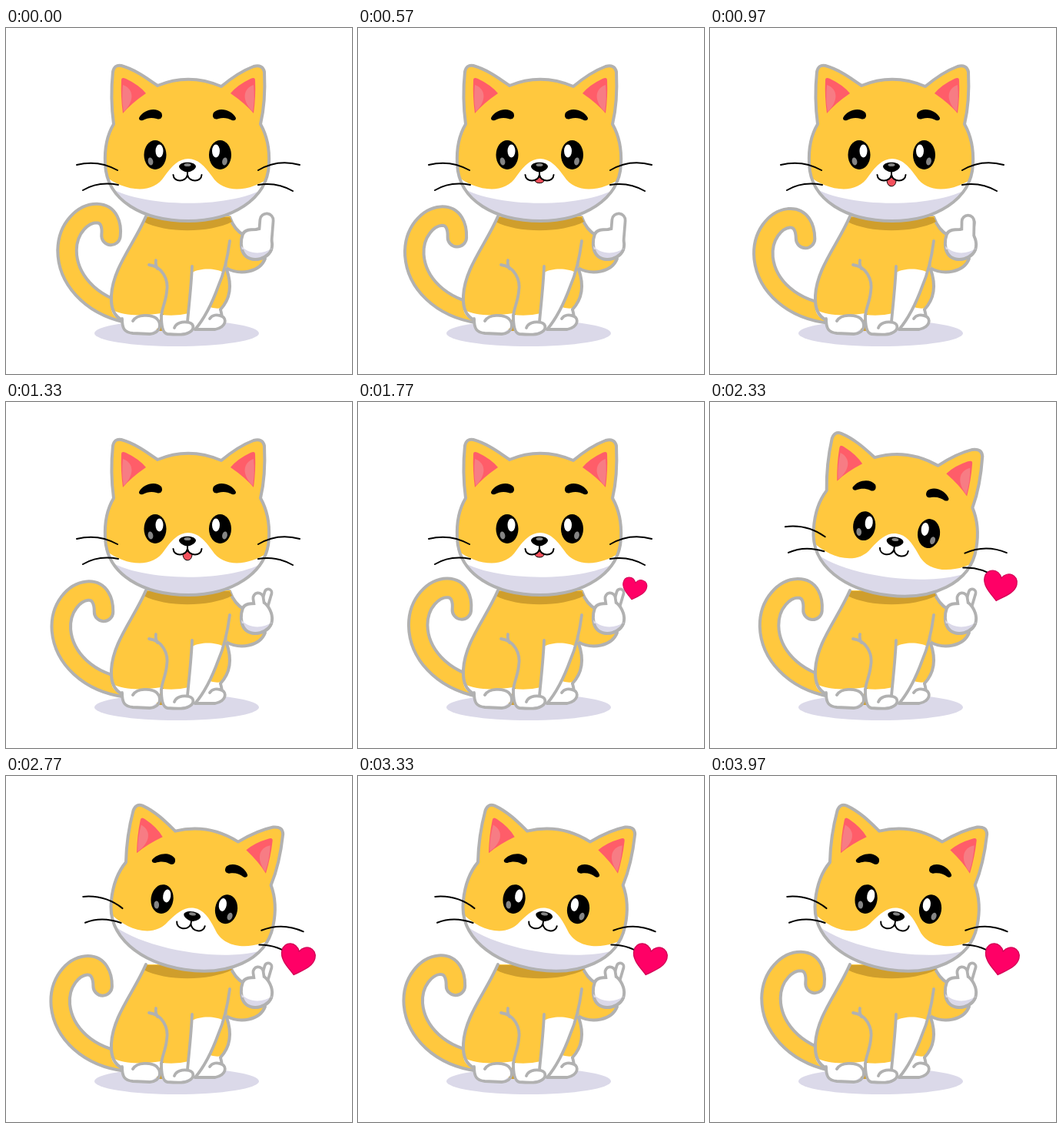
An HTML page that plays this animation: 450 by 450 pixels, repeating every 4.01 s.

```html
<!DOCTYPE html>
<html lang="en">
<head>
<meta charset="utf-8">
<title>Cat with a heart</title>
<style>
  html, body { margin: 0; width: 100%; height: 100%; overflow: hidden; background: #fff; }
  svg { display: block; width: 100vw; height: 100vh; }
  path, ellipse { stroke-linecap: round; stroke-linejoin: round; }
  .fur { fill: #ffc83e; }
  .white { fill: #fff; }
  .shade { fill: #dbd9e9; }
  .dark { fill: #cf9e2c; }
  .edge { stroke: #b1b1b1; stroke-width: 4; }
  .line { fill: none; stroke: #b1b1b1; stroke-width: 3.8; }
  .ink { fill: none; stroke: #000; stroke-width: 2; }
  .grey { fill: #858585; }
  .pink { fill: #ff5d69; }
  .soft { fill: #f77c84; }
  .tail { fill: none; stroke: #b1b1b1; stroke-width: 28.5; }
  .tail.in { stroke: #ffc83e; stroke-width: 20.5; }
</style>
</head>
<body>
<svg viewBox="0 0 450 450">
  <defs>
    <path id="tailPath" d="M158 371C108 360 79.500 325 79.500 289C80 259 101 241 118 241C134 241.500 138 256 136.500 270"/>
    <path id="headPath" d="M140 125C137 103 137 76 139 57Q141 47 150 49C168 54 183 65 197 75Q238 58 280 76C292 66 306 56 322 50Q334 47 336 57C337 77 336 104 331 125C340 141 343 158 342 177C340 224 292 251 237 251C179 251 131 225 129 177C128 158 131 140 140 125Z"/>
    <path id="palm" d="M308 268C311 262 318 262 325 262L334 260C342 264 347 276 346 284C345 300 318 308 309 293C305 286 305 276 308 268Z"/>
    <g id="ear">
      <path class="pink" d="M150 68Q150 63 156 66Q173 74 182 85Q163 98 152 111Q149 89 150 68Z"/>
      <path class="soft" d="M152 74C166 79 168 94 153 109Q150 92 152 74Z"/>
    </g>
    <path id="brow" d="M173 117C178 107 194 102 202 110C205 116 201 120 196 118C189 116 184 117 178 120Q173 121 173 117Z"/>
    <g id="eye">
      <ellipse cx="194" cy="165" rx="14.500" ry="19"/>
      <ellipse class="white" cx="199.500" cy="160" rx="5" ry="8.500"/>
      <ellipse class="grey" cx="188" cy="173.500" rx="3.300" ry="5" transform="rotate(-12 188 173.500)"/>
    </g>
    <clipPath id="headClip"><use href="#headPath"/></clipPath>
    <clipPath id="palmClip"><use href="#palm"/></clipPath>
  </defs>

  <ellipse class="shade" cx="222" cy="397" rx="107" ry="17"/>

  <g id="tail">
    <use class="tail" href="#tailPath"/>
    <use class="tail in" href="#tailPath"/>
  </g>

  <!-- arm -->
  <path class="fur edge" d="M284 246L291 246C296 260 303 266 310 270L337 300C330 318 304 322 286 312Z"/>

  <!-- body fills -->
  <path class="fur" d="M182 245C166 282 139 312 137 348C136 367 142 375 151 380L153 392H270L280 366C292 352 294 334 287 314L292 245Z"/>
  <path class="dark" d="M181 246L291 246L294 252C264 267 208 267 179 252ZM196 372H205V394H196Z"/>
  <path class="white" d="M262 362Q273 366 280 364C288 376 287 390 273 391H244Z"/>
  <path class="white" d="M242 318C252 312 273 312 283 318C274 346 264 374 246 392H236Z"/>
  <path class="white" d="M137 366C155 376 180 374 202 371L198 390L187 398H165Q152 396 151 380Q139 377 137 366Z"/>
  <path class="white" d="M202 373Q222 375 238 371L244 390Q234 399 210 398Q202 394 202 373Z"/>

  <!-- body lines -->
  <path class="line" style="stroke-width:4" d="M182 245C166 282 139 312 137 348C136 367 142 375 151 380M287 314C294 334 292 352 279 366"/>
  <path class="line" d="M151 378C151 391 154 396 165 397L187 398C201 397 203 385 196 378C189 372 170 372 165 381"/>
  <path class="line" d="M279 366L281 375M246 392H272C287 389 287 378 281 375C275 372 268 373 265 378"/>
  <path class="line" d="M202 374C202 385 203 397 210 398C222 399 232 399 236 397C246 393 245 385 238 383C229 381 221 384 219 390"/>
  <path class="line" d="M186 308C203 310 212 327 209 343C208 355 203 364 202 374M195 302Q194 308 197 313M242 310C241 335 238 360 236 382M291 277C288 300 283 320 276 336C268 358 258 378 246 392"/>

  <!-- hand -->
  <g id="hand">
    <path class="finger out"/><path class="finger in"/>
    <path class="thumb out"/>
    <use class="white edge" href="#palm"/>
    <path class="thumb in"/>
    <path class="shade" clip-path="url(#palmClip)" d="M304 281C314 295 334 296 348 285V306H304Z"/>
    <use class="edge" style="clip-path:inset(30px 0 0 0)" fill="none" href="#palm"/>
  </g>

  <g id="head">
    <use class="fur" href="#headPath"/>
    <g clip-path="url(#headClip)">
      <path class="white" d="M126 190C148 210 189 220 206 193C216 179 225 170 237 170C249 170 258 179 268 193C285 220 326 210 348 190V260H126Z"/>
      <path class="shade" d="M124 200C165 237 309 237 348 200V260H124Z"/>
    </g>
    <use class="edge" fill="none" href="#headPath"/>

    <use href="#ear"/>
    <use href="#ear" transform="matrix(-1 0 0 1 474 0)"/>
    <use href="#brow"/>
    <use href="#brow" transform="matrix(-1 0 0 1 472 0)"/>
    <use href="#eye"/>
    <use href="#eye" transform="matrix(-1 0 0 1 472.500 0)"/>

    <path id="tongue" fill="#f4515d" stroke="#000" stroke-width="1"/>
    <path class="ink" d="M236 186V191M217.500 191C218 201 234 201 236 191C238 201 254 201 254.500 191"/>
    <path d="M225 180C226 173 246 173 247 180C247 184 239 187.500 236 187.500C233 187.500 225 184 225 180Z"/>
    <ellipse class="grey" cx="236" cy="178" rx="4.500" ry="2"/>

    <path class="ink" d="M92 178Q120 171 145 185M100 211Q120 199 146 204M328 185Q353 170 382 178M328 204Q352 200 373 212"/>
  </g>

  <path id="heart" fill="#ff0066" stroke="#d60057" stroke-width="1.500" d="M0 21C-8 14 -22 6 -22 -6C-22 -19 -6 -22 0 -10C6 -22 22 -19 22 -6C22 6 8 14 0 21Z"/>
</svg>

<script>
const LOOP = 4010;
const $ = s => document.querySelector(s);
const span = (t, a, b) => Math.min(1, Math.max(0, (t - a) / (b - a)));
const ease = (t, a, b) => (1 - Math.cos(Math.PI * span(t, a, b))) / 2;
const mix = (a, b, p) => a + (b - a) * p;

// A rounded finger: from and to are [x1, y1, x2, y2, width]
function finger(name, from, to, p) {
  const [x1, y1, x2, y2, w] = from.map((v, i) => mix(v, to[i], p));
  for (const [part, color, width] of [['out', '#b1b1b1', w], ['in', '#fff', w - 7.5]]) {
    const el = $(`.${name}.${part}`);
    el.setAttribute('d', `M${x1} ${y1}L${x2} ${y2}`);
    el.setAttribute('stroke', color);
    el.setAttribute('stroke-width', width);
  }
}

function draw(t) {
  const swing = 3.3 * (Math.cos(4 * Math.PI * t / LOOP) - 1);
  $('#tail').setAttribute('transform', `rotate(${swing} 165 380)`);

  const tilt = 9 * ease(t, 1800, 2600);
  $('#head').setAttribute('transform', `rotate(${tilt} 230 220)`);

  const open = ease(t, 330, 830) - ease(t, 1550, 2000);
  const low = 198 + 10.5 * open;
  $('#tongue').setAttribute('d', `M230 198Q235 197 236 193Q237 197 242 198C242 ${low} 230 ${low} 230 198Z`);
  $('#tongue').style.display = open > 0.02 ? '' : 'none';

  const pose = ease(t, 800, 1250);
  finger('thumb', [337, 275, 339, 250, 21], [331, 275, 328, 255, 17], pose);
  finger('finger', [338, 272, 339, 255, 12], [336, 265, 341, 248, 13], pose);

  const rise = Math.sin(Math.PI / 2 * span(t, 1400, 2600));
  const size = rise ** 0.45;
  $('#heart').setAttribute('transform',
    `translate(${mix(342, 379, rise)} ${mix(246, 238, rise)}) rotate(13) scale(${size})`);
  $('#heart').style.display = rise > 0 ? '' : 'none';
}

const start = performance.now();
function tick() {
  draw((performance.now() - start) % LOOP);
  requestAnimationFrame(tick);
}
tick();
</script>
</body>
</html>
```
